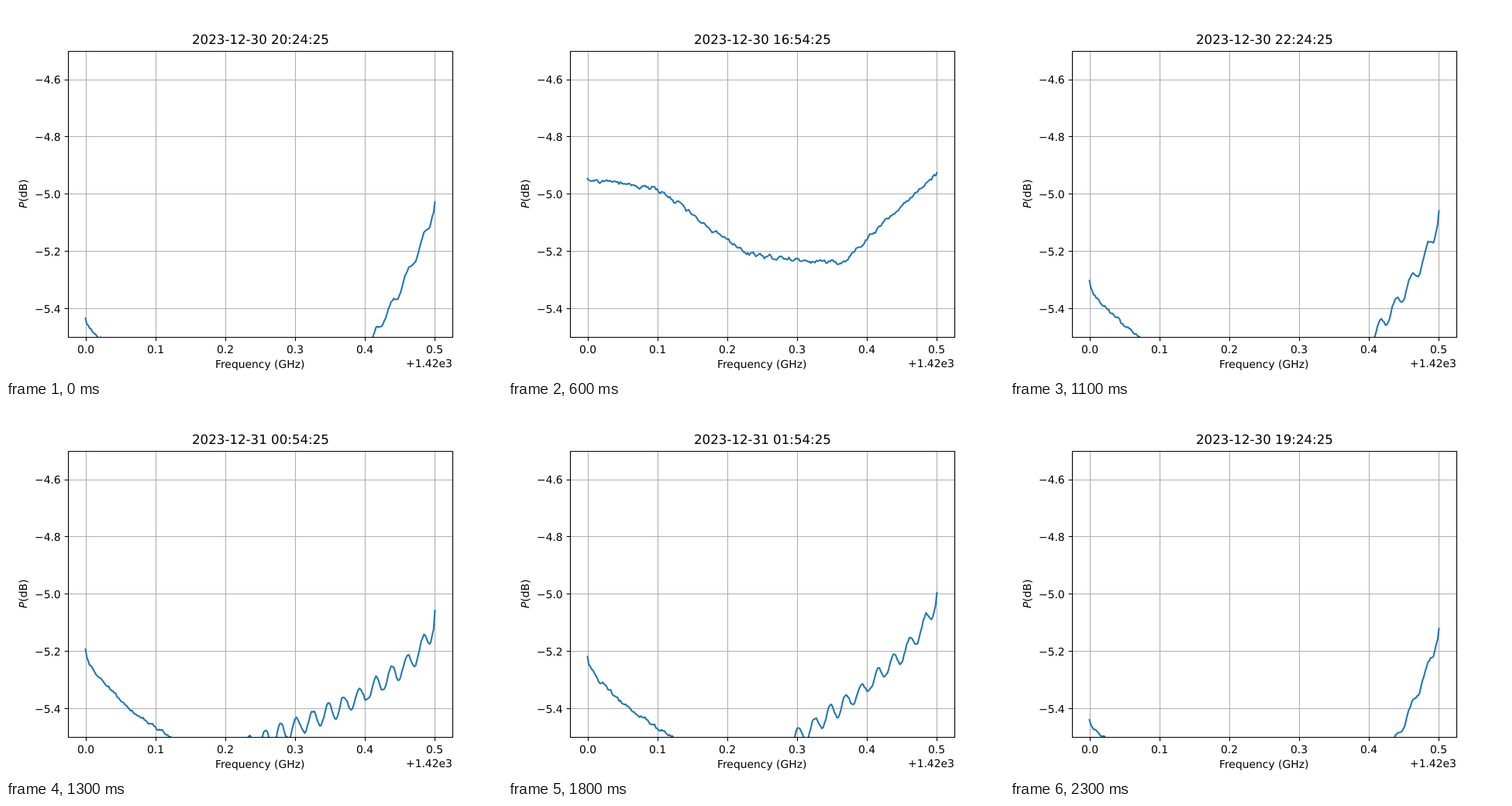
An HTML page that plays this animation: 640x480 px, repeating every 2400 ms.

```html
<!DOCTYPE html>
<html lang="en">
<head>
<meta charset="utf-8">
<title>Spectrum over time</title>
<style>
  html, body { margin: 0; width: 100%; height: 100%; overflow: hidden; background: #fff; }
  svg { display: block; }
  text { font: 13.89px "DejaVu Sans", sans-serif; text-rendering: geometricPrecision; }
  #title { font-size: 16.67px; }
  path { fill: none; stroke: #000; stroke-width: 1.11; }
  #grid { stroke: #b0b0b0; }
  #line { stroke: #1f77b4; stroke-width: 2.08; stroke-linejoin: round; stroke-linecap: square; }
</style>
</head>
<body>
<svg width="640" height="480" viewBox="0 0 640 480">
  <clipPath id="plot"><rect x="80" y="57.6" width="496" height="369.6"/></clipPath>
  <path id="grid"/>
  <path id="ticks"/>
  <path id="line" clip-path="url(#plot)"/>
  <path d="M80.5 58.5H576.5V427.5H80.5Z"/>
  <g id="labels"></g>
  <text id="title" y="49"></text>
  <text transform="translate(27 261) rotate(-90)"><tspan font-style="italic">P</tspan>(dB)</text>
</svg>
<script>
const $ = id => document.getElementById(id);
const LEFT = 102.545, SPAN = 450.91, POINTS = 256;
const CENTER = 0.5, RIGHT = 1;

const mix = (a, b, k) => a + (b - a) * k;
const clamp = (v, lo, hi) => Math.min(hi, Math.max(lo, v));
const smooth = (a, b, v) => {
  const k = clamp((v - a) / (b - a), 0, 1);
  return k * k * (3 - 2 * k);
};

// A slot counts half hours since 16:24:25; the slots play in shuffled order.
const order = [8, 13, 3, 18, 10, 1, 15, 5, 9, 21, 12, 2, 17, 7, 0, 14, 4, 19, 11, 20, -1, 16, 6];

// How the deep valley develops: end heights, steepness of both flanks, bend and ripple of the right one.
const stages = [
  { slot: 6, left: 406, fall: 170, right: 288, rise: 760, bend: 0.8, ripple: 6 },
  { slot: 8, left: 404, fall: 190, right: 254, rise: 700, bend: 0.8, ripple: 6 },
  { slot: 9, left: 382, fall: 220, right: 268, rise: 660, bend: 0.8, ripple: 8 },
  { slot: 17, left: 316, fall: 280, right: 266, rise: 235, bend: 0.5, ripple: 12 },
  { slot: 20, left: 330, fall: 243, right: 230, rise: 380, bend: 0.7, ripple: 10 }
];

function stageAt(slot) {
  const s = clamp(slot, 6, 20);
  const i = Math.max(1, stages.findIndex(stage => stage.slot >= s));
  const a = stages[i - 1], b = stages[i];
  const k = (s - a.slot) / (b.slot - a.slot);
  return Object.fromEntries(Object.keys(a).map(key => [key, mix(a[key], b[key], k)]));
}

// Both shapes take u from 0 to 1 across the band and give a height in pixels.
const shallow = (u, slot) =>
  225 + 40 * u + 78 * smooth(0.14, 0.51, u) - 470 * Math.max(0, u - 0.72 - 0.007 * slot);

function valley(u, stage) {
  const wave = Math.cos(2 * Math.PI * (LEFT + SPAN * u - 436) / 20.4);
  const down = stage.left + stage.fall * u ** 0.65;
  const up = stage.right + stage.rise * (1 - u) ** stage.bend - stage.ripple * wave;
  return Math.min(down, up);
}

function jitter(seed) {
  let s = seed * 7919 + 17, n = 0;
  return () => {
    s = (s * 16807) % 2147483647;
    return n = 0.55 * n + 4 * (s / 2147483647 - 0.5);
  };
}

function trace(slot) {
  const stage = stageAt(slot), deep = clamp((slot - 3) / 3, 0, 1);
  const shared = jitter(1), own = jitter(slot + 5);
  const points = Array.from({ length: POINTS }, (_, i) => {
    const u = i / (POINTS - 1);
    const y = mix(shallow(u, slot), valley(u, stage), deep) + shared() + 0.6 * own();
    return (LEFT + SPAN * u).toFixed(2) + " " + y.toFixed(2);
  });
  return "M" + points.join("L");
}

function stamp(slot) {
  const date = new Date(Date.UTC(2023, 11, 30, 16, 24, 25) + slot * 1800000);
  return date.toISOString().slice(0, 19).replace("T", " ");
}

// Text starts on a whole pixel.
function setText(node, text, x, align) {
  node.textContent = text;
  node.setAttribute("x", Math.round(x - align * node.getComputedTextLength()));
}

function addLabel(text, x, y, align) {
  const node = document.createElementNS("http://www.w3.org/2000/svg", "text");
  node.setAttribute("y", y);
  $("labels").append(node);
  setText(node, text, x, align);
}

function drawAxes() {
  let grid = "", ticks = "";
  for (let i = 0; i < 6; i++) {
    const x = LEFT + SPAN * i / 5, px = Math.round(x) + 0.5;
    grid += `M${px} 58V427`;
    ticks += `M${px} 427.5v4.86`;
    addLabel((i / 10).toFixed(1), x, 448, CENTER);
  }
  for (let i = 0; i < 5; i++) {
    const y = 94.56 + 73.92 * i, py = Math.round(y) + 0.5;
    grid += `M80 ${py}H576`;
    ticks += `M80.5 ${py}h-4.86`;
    addLabel("\u2212" + (4.6 + i / 5).toFixed(1), 70.3, Math.round(y + 5.3), RIGHT);
  }
  $("grid").setAttribute("d", grid);
  $("ticks").setAttribute("d", ticks);
  addLabel("Frequency (GHz)", 328, 467, CENTER);
  addLabel("+1.42e3", 576, 466, RIGHT);
}

let shown = null;
const start = performance.now();
function draw() {
  const t = (performance.now() - start) % 2400;
  const slot = order[Math.max(0, Math.floor(t / 100) - 1)];
  if (slot !== shown) {
    shown = slot;
    $("line").setAttribute("d", trace(slot));
    setText($("title"), stamp(slot), 328, CENTER);
  }
  requestAnimationFrame(draw);
}
drawAxes();
draw();
</script>
</body>
</html>
```
